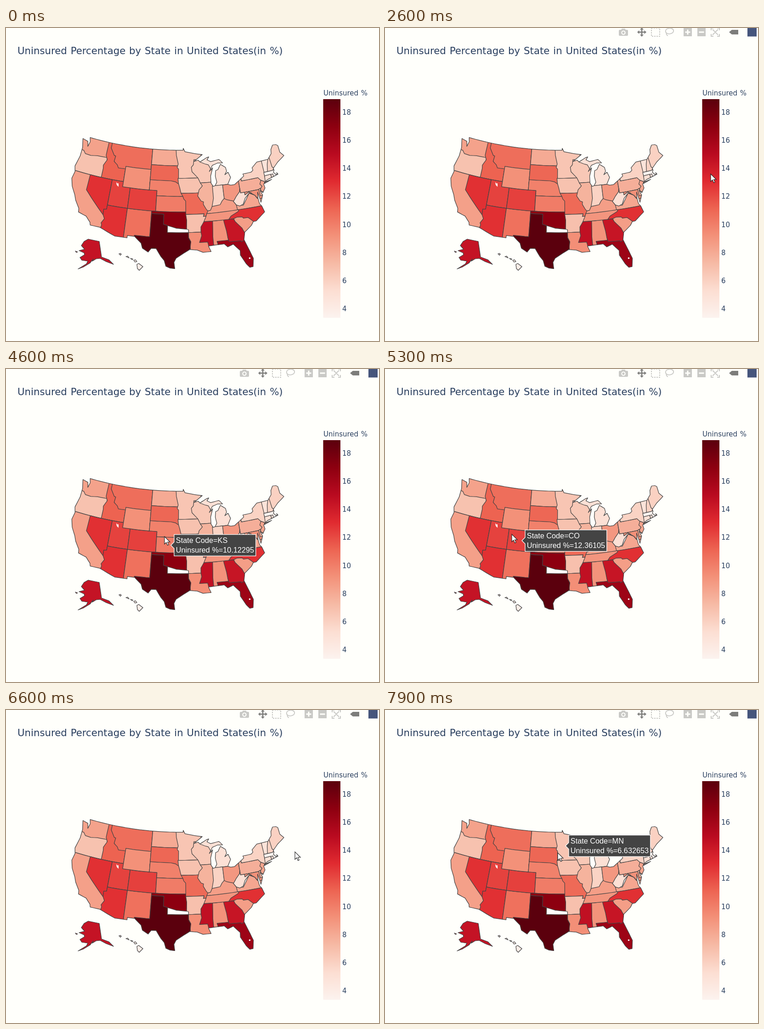
An HTML page for the animation above (8 s loop, 812x682 px).

```html
<!DOCTYPE html>
<html lang="en">
<head>
<meta charset="utf-8">
<title>Uninsured percentage map</title>
<style>
html, body { margin: 0; width: 100%; height: 100%; overflow: hidden; background: #fffffb; }
svg { display: block; width: 812px; height: 682px; }
text { fill: #2a3f5f; font: 15px "DejaVu Sans", sans-serif; word-spacing: 1px; }
.title { font-size: 21.25px; word-spacing: 1.15px; }
.land path { stroke: #444; stroke-width: 1.25; stroke-linejoin: round; }
#tip text { fill: #fff; font: 16.25px "Liberation Sans", Arial, sans-serif; word-spacing: 0; }
</style>
</head>
<body>
<svg viewBox="0 0 812 682">
  <defs>
    <linearGradient id="scale" x1="0" y1="1" x2="0" y2="0"></linearGradient>
    <clipPath id="coast"></clipPath>
  </defs>
  <text class="title" x="25" y="57">Uninsured Percentage by State in United States(in %)</text>
  <g id="states" class="land" clip-path="url(#coast)"></g>
  <g id="insets" class="land"></g>
  <g fill="#fff">
    <path d="M240 336l3 3 2-1v8l-4-4z"/>
    <circle cx="530.5" cy="501.5" r="1.8"/>
  </g>
  <text x="691" y="147">Uninsured %</text>
  <rect x="690.5" y="155" width="37.5" height="476.5" fill="url(#scale)"/>
  <g id="ticks"></g>
  <g id="bar" fill="#c9c9c6" stroke="#c9c9c6" stroke-width="0">
    <path fill-rule="evenodd" d="M511 4h3l1.5-2.5h7L524 4h3q2 0 2 2v9q0 2-2 2h-16q-2 0-2-2V6q0-2 2-2zM519 5.500a4.700 4.700 0 1 0 .1 0zM519 7.500a2.700 2.700 0 1 1-.1 0z"/>
    <path fill="#7d7d7b" d="M559-1l4 4.500h-2.700v4.200h4.200V5l4.500 4-4.500 4v-2.700h-4.200v4.200h2.700l-4 4.500-4-4.500h2.700v-4.200h-4.200V13L549 9l4.500-4v2.700h4.200V3.500H555z"/>
    <rect x="580" y="0" width="18" height="18" fill="none" stroke-width="2" stroke-dasharray="3 2"/>
    <path d="M614 12c-5-3-4-9 2-11s13 1 12 6-9 7-13 5-3 3 1 5" fill="none" stroke-width="1.8"/>
    <path fill-rule="evenodd" d="M650 0h18v18h-18zM657.500 3.500v4h-4v3h4v4h3v-4h4v-3h-4v-4z"/>
    <path fill-rule="evenodd" d="M680 0h18v18h-18zM683.500 7.500v3h11v-3z"/>
    <path d="M710 5V0h5M723 0h5v5M728 13v5h-5M715 18h-5v-5M713 3l12 12M725 3L713 15" fill="none" stroke-width="2"/>
    <path fill="#7d7d7b" d="M749 9l6-5h14v10h-14z"/>
    <rect x="789" y="-1" width="20" height="19.5" fill="#46557c"/>
  </g>
  <g id="tip">
    <path fill="#444" stroke="#fff" stroke-width="1.25"/>
    <text x="10.8" y="-5"></text><text x="10.8" y="16"></text>
  </g>
  <path id="cursor" d="M0 0V16.500L3.900 13 6.600 19 9.200 17.900 6.600 12H12Z" fill="#fff" stroke="#222" stroke-width="1.1"/>
</svg>
<script>
const $ = s => document.querySelector(s);
const add = (parent, tag, attrs, text = '') => {
  const el = document.createElementNS('http://www.w3.org/2000/svg', tag);
  for (const k in attrs) el.setAttribute(k, attrs[k]);
  el.textContent = text;
  $(parent).append(el);
};

const LOW = 3.35, HIGH = 18.95;
const REDS = ['fcf3ef', 'fcded2', 'f6baa5', 'f39179', 'ed6452', 'e02a30', 'b90a20', '8d0010', '5b000d'];
const channels = hex => [0, 2, 4].map(i => parseInt(hex.slice(i, i + 2), 16));
function shade(value) {
  const p = Math.min(.999, Math.max(0, (value - LOW) / (HIGH - LOW))) * 8, i = Math.floor(p);
  const a = channels(REDS[i]), b = channels(REDS[i + 1]);
  return `rgb(${a.map((v, k) => Math.round(v + (b[k] - v) * (p - i)))})`;
}

// Albers equal-area conic, degrees west and north to pixels
const RAD = Math.PI / 180, S1 = Math.sin(29.5 * RAD), S2 = Math.sin(45.5 * RAD);
const N = (S1 + S2) / 2, C = 1 - S1 * S1 + 2 * N * S1, SIZE = 640;
function project([west, north]) {
  const r = SIZE * Math.sqrt(C - 2 * N * Math.sin(north * RAD)) / N, a = N * (96 - west) * RAD;
  return [379.2 + r * Math.sin(a), r * Math.cos(a) - 438.9].map(v => v.toFixed(1));
}
// Closed outline, with parallels subdivided so that they curve
function ring(text) {
  const pts = text.split(' ').map(p => p.split(',').map(Number)), out = [];
  pts.forEach((p, i) => {
    const q = pts[(i + 1) % pts.length], steps = Math.ceil(Math.hypot(q[0] - p[0], q[1] - p[1]));
    for (let k = 0; k < steps; k++) out.push(project(p.map((v, j) => v + (q[j] - v) * k / steps)));
  });
  return 'M' + out.join('L') + 'Z';
}
const area = (value, text) => add('#states', 'path', { d: ring(text), fill: shade(value) });
const box = (value, w, n, e, s) => area(value, `${w},${n} ${e},${n} ${e},${s} ${w},${s}`);

// Shapes reach past the coast, which clips them; each covers part of its earlier neighbours
box(10.7, 116.5, 49.1, 104.05, 44.3);
box(8.4, 125.5, 49.1, 116.5, 45.4);
area(6.8, '125.5,46.27 123.5,46.25 122.8,45.7 121.2,45.65 119.3,45.93 116.5,46 116.5,42 125.5,42');
area(11.2, '117.03,49.1 116.05,49.1 116.05,48 114.8,46.7 114.35,46.65 114.5,45.56 113.45,45 113,44.45 111.05,44.5 111.05,42 117.03,42 117.03,43.8 117.2,44.4 116.46,45.6 117.04,46.4');
box(8.5, 125.5, 42, 114, 32);
area(12.9, '120,42 114.04,42 114.04,36.1 114.7,36.1 114.63,35 120,39');
box(12.3, 114.04, 42, 109.05, 37);
area(12.9, '114.05,37 109.05,37 109.05,31 115,31 114.5,33 114.72,33.4 114.14,34.3 114.63,35 114.74,36.1 114.05,36.2');
box(10.6, 109.05, 37, 103.03, 31);
box(12.36, 109.05, 41, 102.05, 37);
box(9.2, 111.05, 45, 104.05, 41);
box(8, 104.05, 49.1, 96, 45.94);
box(11, 104.05, 45.94, 96, 42.3);
area(9.9, '104.05,43 98.5,43 97.2,42.8 96.4,42.4 95,42 95,40 102.05,40 102.05,41 104.05,41');
box(10.12, 102.05, 40, 94, 37);
area(18.95, '103.04,36.5 99,36.5 99,33 94.04,33 94.04,32 93.55,31.2 93.7,29 97,25 106.8,28 106.62,32 103.06,32');
area(17, '103.03,37 94,37 94.48,33.65 96.9,33.85 98.1,34.13 100,34.56 100,36.5 103.03,36.5');
area(6.63, '97.23,49.5 89,49.5 89,43.5 96.45,43.5 96.45,45.3 96.85,45.6 96.56,46.3 97.1,48');
area(6.8, '96.6,43.5 90,43.5 90,40.6 95.77,40.6 96.1,41.6 96.45,42.5');
area(10.9, '95.77,40.6 89,40.6 89,36 90.37,36 90.15,36.5 94.62,36.5 94.6,39.1 95.1,39.5 95.3,40');
area(6.5, '92.1,47.1 86,47.1 86,42.5 90.64,42.5 91.22,43.5 92.75,44.75 92.9,45.6 92.3,46.1');
area(5.1, '90.4,46.57 90,48 82,48 82,41.73 87,41.73 87.3,45.1 87.6,45.1 88.1,45.9 89.1,46.15');
area(7.6, '90.64,42.5 87,42.5 87,37 89.15,37 89.5,37.3 90.2,38.35 90.1,38.8 90.7,39 91.5,40 91.05,41.2 90.15,41.9');
area(5.9, '87.53,41.76 84.8,41.76 84.8,37.8 88.05,37.8 87.53,39.35');
area(8.9, '84.82,41.72 83.3,41.73 80.52,42.3 80.52,38 84.82,38');
area(6.9, '94.62,36.5 90.15,36.5 90.37,36 89,36 89,33 94.04,33 94.04,33.55 94.48,33.65 94.43,35.4');
area(9.3, '94.04,33 89,33 89,28.5 93.7,28.5 93.7,30.3 93.55,31.2 94.04,32');
area(14.7, '90.3,35 87,35 87,30 89.5,30 89.73,31 91.6,31 91,32.3 91.15,33 91.1,34');
area(9.1, '88.2,35 85,35 85,30 88.4,30 88.45,31.9');
area(16.3, '87.6,31 81,31 79.5,25 88,25 87.45,30.5');
area(14.4, '85.6,35 82.5,35 80.5,32 81,30.7 82.05,30.36 82.2,30.57 84.87,30.7 85.05,31.5 85.18,32.86');
area(8.2, '83.7,36.55 75,36.55 75,38.1 76.6,38.1 77.04,38.8 78.35,39.4 80.3,37.3 82,37.54');
area(8.6, '89.5,36.5 81.9,36.5 82,37.5 82.6,38.4 84.2,38.8 84.82,39.1 85.4,38.7 86,38 88.05,37.8 88.5,37.1 89.15,37');
area(9, '90.3,35 81.5,35 81.5,36.6 89.5,36.5 89.7,36');
area(12.9, '84.3,35 83,35 78.5,33.5 75,33.8 75,36.55 81.68,36.59 81.7,36.3 83.7,35.57');
area(8.6, '83.1,35 82.3,35.2 81.05,35.1 80.8,34.82 79.67,34.8 78.55,33.86 78,32 81.1,32.1 81.5,33 82.9,34.45');
area(7.8, '80.52,42.4 79.76,42.4 79.76,42 74.5,42 74.5,39.72 80.52,39.72');
area(9.2, '79.48,39.72 75,39.72 75,38 76.3,37.9 77.04,38.8 78.35,39.6 79.48,39.2');
area(5.1, '82.6,38.3 82,37.54 81.2,37.25 80.3,37.5 79.6,38.55 78.35,39.4 77.72,39.32 78.4,39.6 79.48,39.2 79.48,39.72 80.52,39.72 80.52,40.64 80.7,40 81.7,39.2');
area(5.9, '79.76,42 79.76,44 76,45.1 73.3,45.1 71.5,41.3 71.5,40.5 74,40.5 73.9,41 74.7,41.36 75.35,42');
area(8.3, '74.7,41.36 73.9,41 73.5,38.8 75.5,39.3 75.15,39.9 74.75,40.2 75.2,40.7');
area(7.6, '75.79,39.72 75.4,39.9 74.9,38.45 75.7,38.46');
box(3.4, 73.5, 42.73, 69.5, 41.3);
area(5, '73.5,42.05 71.8,42.05 71.85,41.2 73.65,40.98');
box(4.6, 71.8, 42.02, 71.25, 41.2);
box(4.8, 73.4, 45.1, 71.5, 42.73);
area(5.9, '71.5,45.1 71.1,45.4 70.6,43 71,42.7 72.46,42.73 72.05,44.1');
area(6, '71.1,45.3 71,48 66,48 66,43 70.7,43.07 70.97,43.4');

const LAKES = '124.7,48.4 123.1,48.15 122.7,47.2 122.4,48.2 122.76,49 95.15,49 95.1,49.38 94.6,48.7 92,48.3 89.6,48 92.1,46.75 90.9,46.95 90.4,46.6 88.4,47.35 87.8,47.45 88.4,46.9 87.4,46.5 85,46.75 84.1,46 85.5,46.08 87,45.75 88,44.6 87,45.25 87.75,43.7 87.8,42.3 87.3,41.65 86.8,41.76 86.25,42.4 86.5,43.6 86.25,44.65 85.6,44.8 84.75,45.77 83.45,45.05 83.3,44.3 83.9,43.65 82.95,44.05 82.45,43 83.45,41.73 82.7,41.5 81.7,41.5 78.9,42.85 79.05,43.27 76.8,43.3 76.2,43.6 76.3,44.1 74.7,45 71.5,45';
const ATLANTIC = '71.1,45.3 70.25,45.9 70,46.7 69.22,47.45 68.3,47.36 67.8,47.07 67.8,45.7 67,44.85 69.1,44 70.7,43.07 70.7,42.6 71,42.3 70.5,41.77 70,41.8 70.2,42.07 69.95,41.7 71.2,41.5 73,41.2 73.9,40.8 74.2,40.5 74.1,39.75 74.9,38.95 75.5,39.5 75.1,38.5 75.9,37.2 76,38.3 76.2,39.3 76.4,38.1 76.3,37 75.9,36.5 75.5,35.25 76.5,34.7 77.9,33.87 78.6,33.86 79.2,33.2 81,32.1 81.45,30.7 80.55,28.3 80.05,26.8 80.4,25.2 81.1,25.15 81.75,25.95 82.75,27.8 82.65,28.7';
const GULF = '84,30.1 85.3,29.7 86,30.35 88,30.3 89.6,30.2 89.1,29.1 90.9,29.05 92.2,29.55 93.85,29.7 95.2,29 96.9,28 97.35,27.2 97.15,25.95 98.2,26.05 99.1,26.4 99.5,27.5 100.3,28.3 101.4,29.77 102.5,29.75 103.15,28.98 104.5,29.65 104.9,30.6 106.53,31.78';
const PACIFIC = '108.2,31.78 108.2,31.33 111.07,31.33 114.8,32.5 117.1,32.53 117.3,33.05 118.5,34.03 120.5,34.45 120.65,35.15 121.9,36.5 122.5,37.5 123.7,38.9 124.4,40.4 124.1,41.8 124.55,42.84 124,45 124.05,46.7';
const coast = ring([LAKES, ATLANTIC, GULF, PACIFIC].join(' ')) + ring('74,40.6 73.7,40.85 71.9,41.05');
add('#coast', 'path', { d: coast });
add('#insets', 'path', { d: coast, fill: 'none' });

// Alaska and Hawaii, in pixels
add('#insets', 'path', { fill: shade(14.5), d: 'M179 460L203 465 208 499 224 505 234 515 218 509 205 502 196 503 188 508 190 503 183 512 168 521 157 525 175 514 178 508 165 506 161 500 171 494 170 490 159 485 171 482 164 474 170 465ZM151 486l5 2-3 1Z' });
add('#insets', 'path', { fill: shade(3.9), d: 'M246 492l3-1 2 2-2 2ZM261 498l4-1 3 4ZM271 502l5 1-1 2ZM278 506l4-1 3 4-4 1ZM285 515l4-2 9 7-8 8-4-4Z' });

REDS.forEach((c, i) => add('#scale', 'stop', { offset: i / 8, 'stop-color': '#' + c }));
for (let v = 4; v <= 18; v += 2) add('#ticks', 'text', { x: 732, y: 617 - (v - 4) * 30.57 }, v);

// Hover labels: value and anchor
const LABELS = {
  KS: ['10.12295', 359, 384], CO: ['12.36105', 298, 374], NE: ['9.914638', 349, 349],
  AR: ['6.903517', 411, 425], MN: ['6.632653', 393, 296]
};
// Cursor: time, x, y, hovered state
const STEPS = [
  [2400, 722, 440], [2600, 709, 318], [3400, 709, 318], [4200, 368, 374, 'KS'],
  [4600, 345, 365, 'KS'], [5200, 290, 364, 'CO'], [5300, 276, 360, 'CO'],
  [5700, 335, 340, 'NE'], [5900, 415, 436, 'AR'], [6200, 480, 395], [6600, 629, 309],
  [6900, 715, 300], [7200, 715, 312], [7700, 408, 318, 'MN'], [7900, 376, 311, 'MN']
];
const [line1, line2] = document.querySelectorAll('#tip text');
let shown = '';
function showLabel(code) {
  if (code === shown) return;
  shown = code;
  $('#tip').style.display = code ? '' : 'none';
  if (!code) return;
  const [value, x, y] = LABELS[code];
  line1.textContent = 'State Code=' + code;
  line2.textContent = 'Uninsured %=' + value;
  const right = line2.getComputedTextLength() + 14.5;
  $('#tip path').setAttribute('d', `M0 0L7 -7V-23.3H${right}V23.3H7V7Z`);
  $('#tip').setAttribute('transform', `translate(${x} ${y})`);
}
function draw() {
  const t = Math.floor(performance.now() % 8000 / 100) * 100;
  $('#bar').setAttribute('opacity', Math.min(1, Math.max(0, (t - 2300) / 300)));
  const i = STEPS.filter(s => s[0] <= t).length - 1, a = STEPS[i], b = STEPS[i + 1] || a;
  $('#cursor').style.display = a ? '' : 'none';
  if (a) {
    const k = (t - a[0]) / (b[0] - a[0] || 1);
    const [x, y] = [1, 2].map(n => a[n] + (b[n] - a[n]) * k);
    $('#cursor').setAttribute('transform', `translate(${x} ${y})`);
  }
  showLabel(a && a[3]);
  requestAnimationFrame(draw);
}
draw();
</script>
</body>
</html>
```
